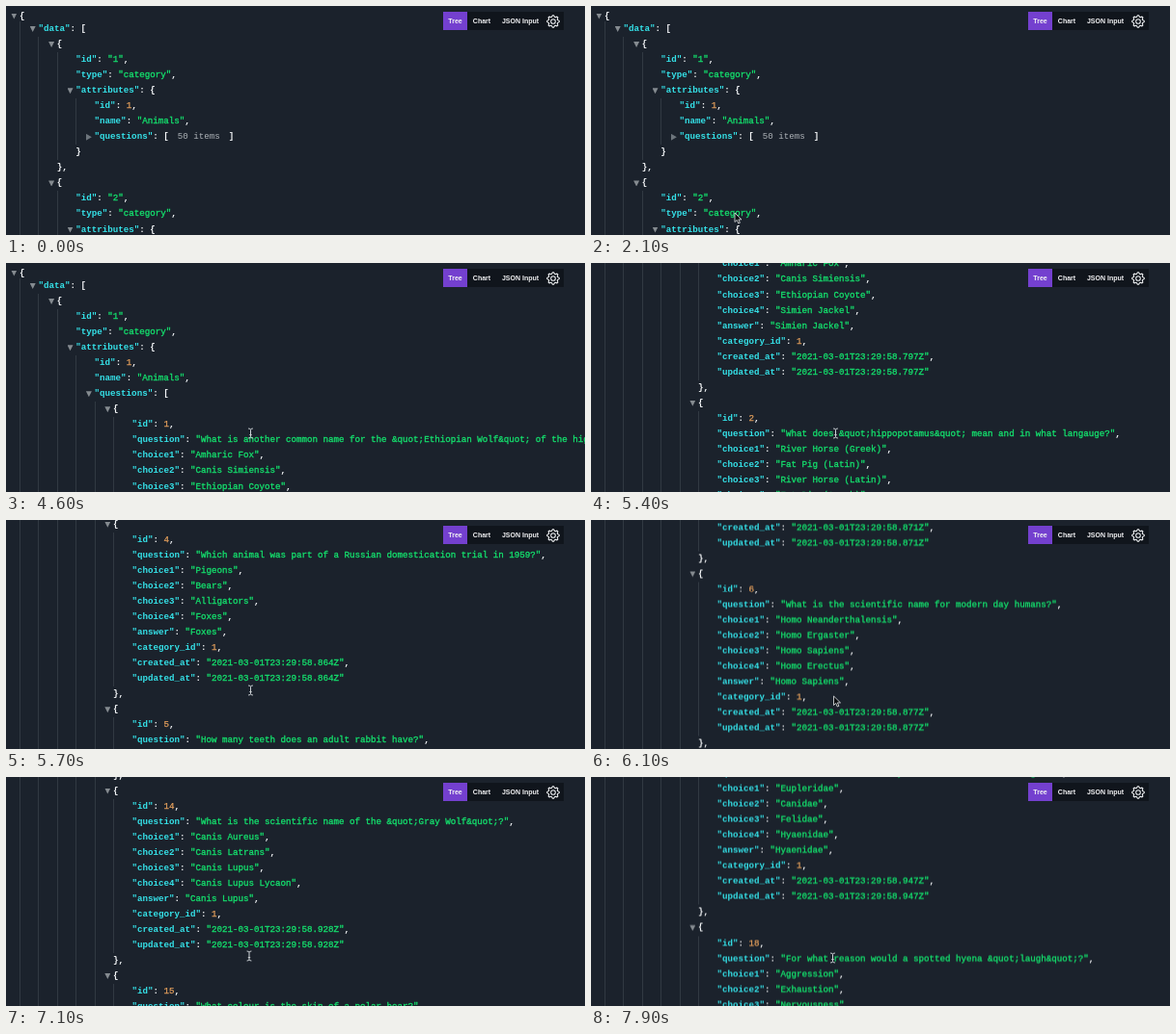
These frames come from a looping animation (600 by 238 pixels, 8000 ms). An HTML page:

```html
<!DOCTYPE html>
<html lang="en">
<head>
<meta charset="utf-8">
<title>JSON tree</title>
<style>
html, body { margin: 0; width: 100%; height: 100%; overflow: hidden; background: #1b222c; }
#stage { position: relative; width: 600px; height: 238px; overflow: hidden; background: #1b222c;
  font: bold 9.18px/16px "Liberation Mono", "Courier New", monospace; color: #f4f6f8; }
#tree { position: absolute; left: -1px; top: 0; will-change: transform; }
.row { position: absolute; left: 0; height: 16.04px; white-space: pre; }
.guides { position: absolute; left: 15px; top: 0; height: 16.1px;
  background: repeating-linear-gradient(90deg, #313942 0 1px, transparent 1px 19.4px); }
.text { position: absolute; top: 0; }
.key { color: #35e2e9; }
.str { color: #14e06d; font-weight: normal; -webkit-text-stroke: .32px #14e06d; }
.num { color: #e5a05c; font-weight: normal; -webkit-text-stroke: .25px #e5a05c; }
.count { color: #aeb3b8; font-weight: normal; padding: 0 9px; }
.arrow { position: absolute; width: 6px; height: 6px; top: 5px; background: #858b90;
  clip-path: polygon(0 0, 100% 0, 50% 100%); }
.arrow.closed { clip-path: polygon(0 0, 100% 50%, 0 100%); top: 4.5px; height: 7px; background: #6d757c; }
#bar { position: absolute; left: 453px; top: 6px; width: 125px; height: 19px; background: #10151c;
  font: bold 7px/19px "Liberation Sans", Arial, sans-serif; color: #f2f2f4; }
#bar span { position: absolute; top: 0; height: 19px; text-align: center; white-space: nowrap; }
#bar .on { background: #7440cf; }
#bar svg { position: absolute; left: 107px; top: 2.5px; }
.cursor { position: absolute; left: 0; top: 0; overflow: visible; visibility: hidden; }
</style>
</head>
<body>
<div id="stage">
  <div id="tree"></div>
  <div id="bar">
    <span class="on" style="left:0;width:25px">Tree</span>
    <span style="left:25px;width:30px">Chart</span>
    <span style="left:57px;width:46px">JSON Input</span>
    <svg width="14" height="14" viewBox="-7 -7 14 14" fill="none" stroke="#eceef0"><path id="gear" stroke-width="1.1" stroke-linejoin="round"/><circle r="2.3" stroke-width="1.1"/></svg>
  </div>
  <svg class="cursor" id="pointer" width="10" height="14"><path d="M0 0V9.5L2.2 7.4L3.8 11L5.4 10.3L3.9 6.9H7Z" fill="#0b0d10" stroke="#e8eaec" stroke-width=".8"/></svg>
  <svg class="cursor" id="hand" width="12" height="14"><path d="M-1.2 .6Q0 -.8 1 .6V4Q2.2 3.2 3 4.3Q4.1 3.7 4.7 4.8Q6.2 4.6 6 6.2L5.3 10.5H-.8L-3.6 6.6Q-3.2 5 -1.2 6.4Z" fill="#fff" stroke="#14181d" stroke-width=".7"/></svg>
  <svg class="cursor" id="beam" width="8" height="12"><path d="M-2.4 -5Q0 -5 0 -3.6Q0 -5 2.4 -5M0 -3.6V3.6M-2.4 5Q0 5 0 3.6Q0 5 2.4 5M-1.2 1.6H1.2" fill="none" stroke="#cdd2d6"/></svg>
</div>
<script>
const LOOP = 8000, PITCH = 16.04, INDENT = 19.4;
const $ = id => document.getElementById(id);
const tree = $('tree');

// question | four choices | index of the answer
const quiz = `What is another common name for the &quot;Ethiopian Wolf&quot; of the highlands?|Amharic Fox|Canis Simiensis|Ethiopian Coyote|Simien Jackel|4
What does &quot;hippopotamus&quot; mean and in what langauge?|River Horse (Greek)|Fat Pig (Latin)|River Horse (Latin)|Fat Pig (Greek)|1
What is the name for a male bee that comes from an unfertilized egg?|Soldier|Drone|Worker|Male|2
Which animal was part of a Russian domestication trial in 1959?|Pigeons|Bears|Alligators|Foxes|4
How many teeth does an adult rabbit have?|30|28|26|24|2
What is the scientific name for modern day humans?|Homo Neanderthalensis|Homo Ergaster|Homo Sapiens|Homo Erectus|3
What is the fastest land animal?|Lion|Cheetah|Pronghorn Antelope|Wildebeest|2
What do you call a baby bat?|Cub|Chick|Pup|Kid|3
What is the collective noun for rats?|Pack|Race|Drift|Mischief|4
How many known living hyena species are there?|8|2|4|6|3
Cashmere is the wool from which kind of animal?|Goat|Sheep|Camel|Llama|1
What is the scientific name for the &quot;Polar Bear&quot;?|Ursus Spelaeus|Ursus Maritimus|Ursus Americanus|Ursus Arctos|2
Which species of Brown Bear is not extinct?|Syrian Brown Bear|California Grizzly|Atlas Bear|Mexican Grizzly|1
What is the scientific name of the &quot;Gray Wolf&quot;?|Canis Aureus|Canis Latrans|Canis Lupus|Canis Lupus Lycaon|3
What colour is the skin of a polar bear?|Black|White|Pink|Green|1
Which class of animals are newts members of?|Fish|Reptiles|Mammals|Amphibian|4
What scientific family does the Aardwolf belong to?|Eupleridae|Canidae|Felidae|Hyaenidae|4
For what reason would a spotted hyena &quot;laugh&quot;?|Aggression|Exhaustion|Nervousness|Excitement|3`
  .split('\n').map(line => line.split('|'));

function el(parent, cls, text = '') {
  const node = document.createElement(cls === 'row' || cls === 'guides' ? 'div' : 'span');
  node.className = cls;
  node.textContent = text;
  return parent.appendChild(node);
}

// parts: [class, text] pairs; arrow: '' | 'open' | 'closed'
function row(parent, index, depth, parts, arrow = '') {
  const node = el(parent, 'row');
  node.style.top = (index ? 16 + PITCH * (index - 1) : 2.6) + 'px';
  if (depth) el(node, 'guides').style.width = depth * INDENT - 10 + 'px';
  const x = 15 + depth * INDENT;
  if (arrow) el(node, 'arrow ' + arrow).style.left = x - 8.7 + 'px';
  const text = el(node, 'text');
  text.style.left = x + 'px';
  for (const [cls, s] of parts) el(text, cls, s);
}

const key = name => [['key', `"${name}"`], ['', ': ']];
function field(parent, index, depth, name, value, last) {
  const isNum = typeof value === 'number';
  row(parent, index, depth, [...key(name), [isNum ? 'num' : 'str', isNum ? value : `"${value}"`], ['', last ? '' : ',']]);
}
const open = (parent, index, depth, name, brace = '{') =>
  row(parent, index, depth, [...(name ? key(name) : []), ['', brace]], 'open');
const close = (parent, index, depth, s) => row(parent, index, depth, [['', s]]);

function category(parent, index, id) {
  open(parent, index, 2);
  field(parent, index + 1, 3, 'id', id);
  field(parent, index + 2, 3, 'type', 'category');
  open(parent, index + 3, 3, 'attributes');
}

open(tree, 0, 0);
open(tree, 1, 1, 'data', '[');
category(tree, 2, '1');
field(tree, 6, 4, 'id', 1);
field(tree, 7, 4, 'name', 'Animals');

const folded = el(tree, 'folded'), unfolded = el(tree, 'unfolded');
row(folded, 8, 4, [...key('questions'), ['', '['], ['count', '50 items'], ['', ']']], 'closed');
close(folded, 9, 3, '}');
close(folded, 10, 2, '},');
category(folded, 11, '2');

open(unfolded, 8, 4, 'questions', '[');
quiz.forEach(([question, ...rest], i) => {
  let r = 9 + i * 12;
  const answer = rest[rest[4] - 1];
  const ms = i ? Math.round(877 + 6.4 * (i - 5)) : 797;
  const stamp = `2021-03-01T23:29:58.${ms}Z`;
  const put = (name, value, last) => field(unfolded, r++, 6, name, value, last);
  open(unfolded, r++, 5);
  put('id', i + 1);
  put('question', question);
  for (let c = 0; c < 4; c++) put('choice' + (c + 1), rest[c]);
  put('answer', answer);
  put('category_id', 1);
  put('created_at', stamp);
  put('updated_at', stamp, true);
  close(unfolded, r, 5, '},');
});

// eight-toothed gear outline
$('gear').setAttribute('d', 'M' + Array.from({ length: 32 }, (_, i) => {
  const a = (i - .5) * Math.PI / 16, r = i % 4 < 2 ? 6.3 : 4.9;
  return (r * Math.cos(a)).toFixed(2) + ' ' + (r * Math.sin(a)).toFixed(2);
}).join('L') + 'Z');

// [time, scroll offset]
const scrolls = [[0, 0], [5100, 70], [5200, 165], [5400, 199], [5500, 370], [5600, 560], [5700, 725],
  [5800, 845], [5900, 905], [6100, 1058.5], [6200, 1330], [6300, 1570], [6400, 1700], [6700, 2093],
  [6800, 2290], [7000, 2480], [7100, 2640], [7400, 2800], [7800, 3110], [7900, 3267.5]];
// [time, shape, x, y]
const moves = [[0, ''], [2100, 'pointer', 149, 215], [2200, 'pointer', 143, 205], [2300, 'pointer', 129, 182],
  [2400, 'pointer', 114, 158], [2500, 'pointer', 104, 142], [2600, 'pointer', 100, 133], [2800, 'hand', 89, 135],
  [3200, 'hand', 87, 136], [3300, 'hand', 85.5, 136], [4400, 'pointer', 122, 146], [4500, 'pointer', 196, 164],
  [4600, 'beam', 253.5, 177], [6100, 'pointer', 251.5, 183], [6700, 'beam', 252, 186], [7400, 'beam', 250.5, 188]];
const UNFOLD = 3800;
const at = (table, t) => table.findLast(step => step[0] <= t);

function frame(now) {
  const t = now % LOOP;
  folded.style.display = t < UNFOLD ? '' : 'none';
  unfolded.style.display = t < UNFOLD ? 'none' : '';
  tree.style.transform = `translateY(${-at(scrolls, t)[1]}px)`;
  const [, shape, x, y] = at(moves, t);
  for (const id of ['pointer', 'hand', 'beam']) {
    const style = $(id).style;
    style.visibility = id === shape ? 'visible' : 'hidden';
    if (id === shape) style.transform = `translate(${x}px, ${y}px)`;
  }
  requestAnimationFrame(frame);
}
requestAnimationFrame(frame);
</script>
</body>
</html>
```
